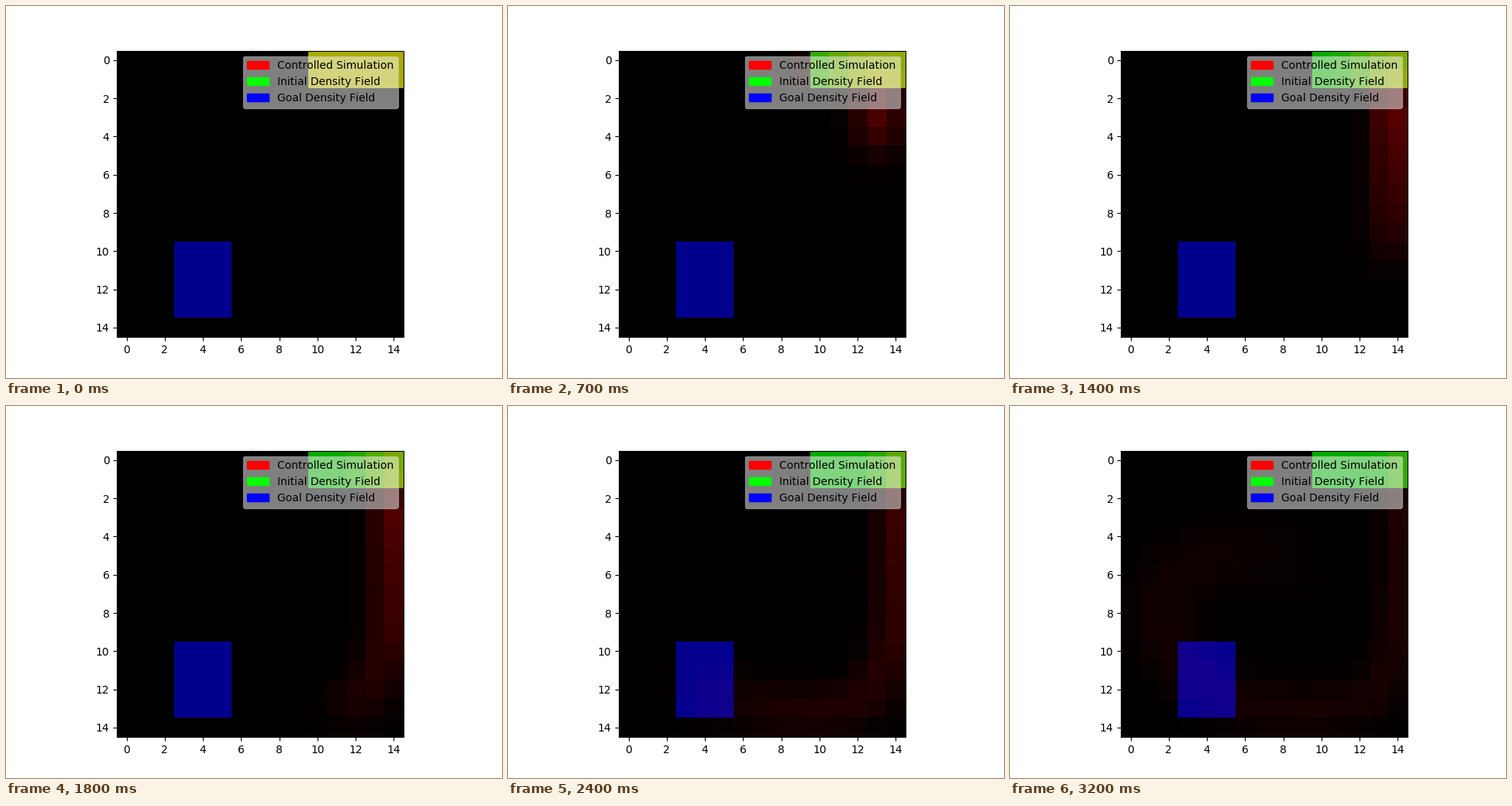
Write a matplotlib script that moves like this. It is 640 by 480 pixels and loops after 3300 ms.

```python
import numpy as np
import matplotlib.pyplot as plt
from matplotlib.animation import FuncAnimation
from matplotlib.patches import Patch

plt.rcParams["text.kerning_factor"] = 6

N, FRAMES = 15, 33
START, GOAL = 170, 141  # channel levels of the two fixed boxes
TOTAL = 10 * START
STEP = 0.5              # time between two puffs, in frames
Y, X = np.mgrid[0:N, 0:N].astype(float)

# Course of the stream: down the right wall, along the floor, up the left.
PATH = np.array([(14, 1.7), (14, 9.5), (12.8, 12.6), (9, 13.3), (4.5, 12.3),
                 (1.8, 10), (1.6, 6.5), (3.5, 5), (9, 5)])
REACH = np.append(0, np.cumsum(np.hypot(*np.diff(PATH, axis=0).T)))


def stock(t):
    """Mass that has not yet left the starting box."""
    return TOTAL * np.exp(-(t / 15) ** 1.3)


def reservoir(t):
    """The starting box, emptied from its left side."""
    edge = 9.5 + 4 * (1 - np.exp(-(t / 14) ** 2))
    soft = 0.05 + 0.07 * t * np.exp(1 - t / 10)
    shape = (Y < 2) / (1 + np.exp(np.clip((edge - X) / soft, -40, 40)))
    return stock(t) * shape / shape.sum()


def stream(t):
    """Puffs released by the box, speeding up along the path."""
    born = np.arange(0, t, STEP)
    mass = stock(born) - stock(born + STEP)
    age = t - born
    s = 0.25 * age + 0.026 * age ** 2
    px = np.interp(s, REACH, PATH[:, 0]) - 3 * np.exp(-t / 6)
    py = np.interp(s, REACH, PATH[:, 1])
    width = 0.6 + 0.025 * s + 0.6 * np.exp(-t / 9)

    field = np.zeros((N, N))
    for x, y, w, m in zip(px, py, width, mass):
        puff = np.exp(-((X - x) ** 2 + (Y - y) ** 2) / (2 * w * w))
        field += m * puff / puff.sum()
    return field


def picture(t):
    rgb = np.zeros((N, N, 3), np.uint8)
    rgb[..., 0] = np.clip(np.rint(reservoir(t) + stream(t)), 0, START)
    rgb[0:2, 10:15, 1] = START
    rgb[10:14, 3:6, 2] = GOAL
    return rgb


fig, ax = plt.subplots(figsize=(6.4, 4.8), dpi=100)
image = ax.imshow(picture(0), interpolation="nearest")
labels = {"Controlled Simulation": "red",
          "Initial Density Field": "lime",
          "Goal Density Field": "blue"}
ax.legend(handles=[Patch(color=c, label=s) for s, c in labels.items()],
          loc="upper right", framealpha=0.5)


def update(i):
    image.set_data(picture(i))
    return [image]


anim = FuncAnimation(fig, update, frames=FRAMES, interval=100, repeat=True,
                     repeat_delay=0)
plt.show()
```
